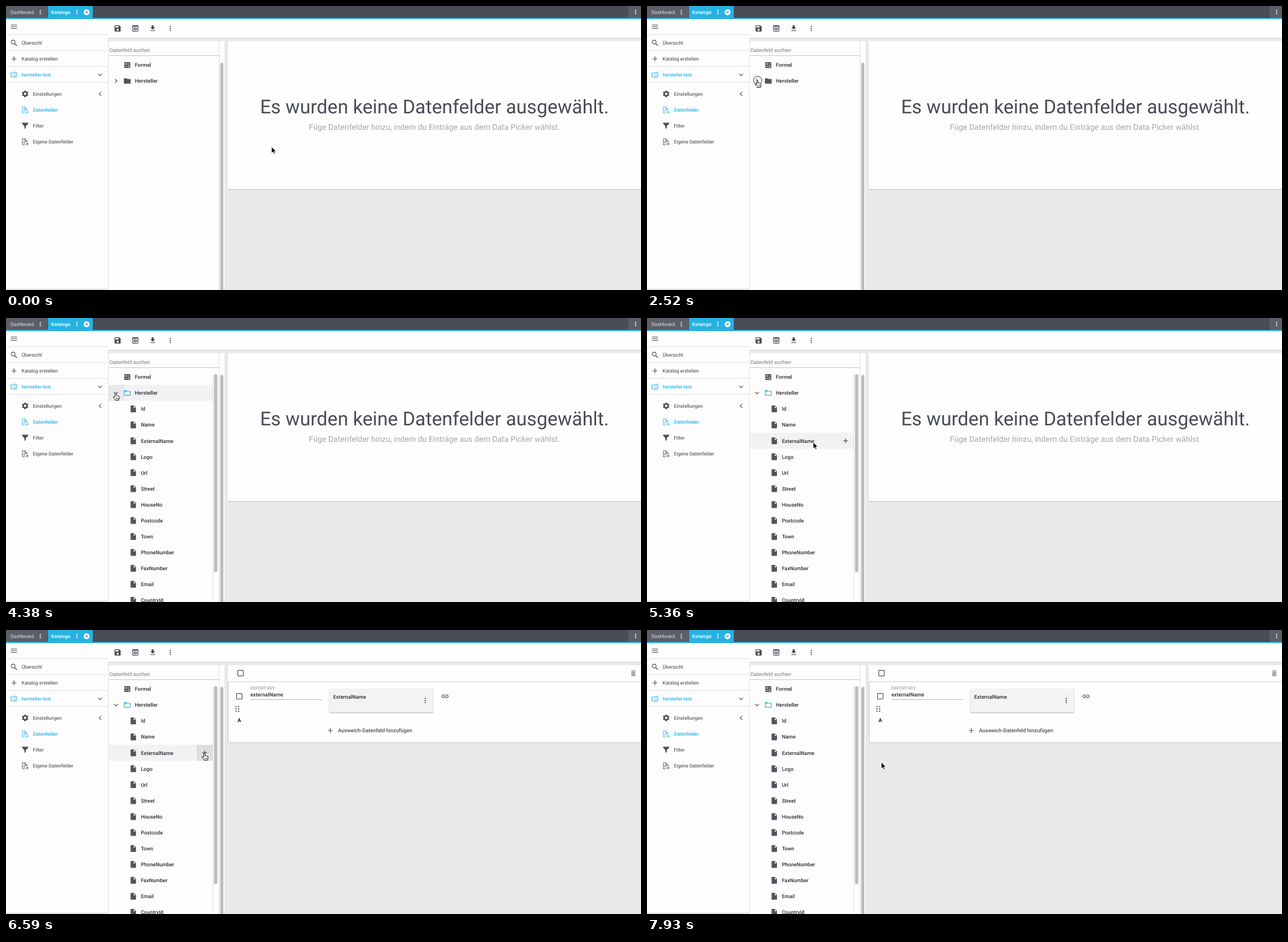
Recreate the animation shown at these times as an HTML page. Size 1119 by 500 pixels, loop 8 s.

```html
<!DOCTYPE html>
<html lang="de">
<head>
<meta charset="utf-8">
<title>Kataloge</title>
<style>
html, body { margin: 0; width: 100%; height: 100%; overflow: hidden; background: #e8e9eb; }
svg { display: block; width: 1119px; height: 500px; }
text { font-family: Roboto, Arial, sans-serif; font-size: 9.2px; fill: #3c3e47; text-rendering: geometricPrecision; white-space: pre; }
text.s { font-size: 8.5px; }
text.m { font-weight: 500; }
text.c { text-anchor: middle; }
</style>
</head>
<body>
<svg id="stage" viewBox="0 0 1119 500" xmlns="http://www.w3.org/2000/svg"></svg>
<script>
const DARK = '#4a4c56', CYAN = '#26b2e2', LINE = '#dedfe2', PAPER = '#fdfdfd', INK = '#2b2c33';
const ROW = 28.07, ROW0 = 132;
const FIELDS = ['Id', 'Name', 'ExternalName', 'Logo', 'Url', 'Street', 'HouseNo', 'Postcode',
  'Town', 'PhoneNumber', 'FaxNumber', 'Email', 'CountryId'];

const PATHS = {
  save: 'M17 3H5c-1.11 0-2 .9-2 2v14c0 1.1.89 2 2 2h14c1.1 0 2-.9 2-2V7l-4-4zm-5 16c-1.66 0-3-1.34-3-3s1.34-3 3-3 3 1.34 3 3-1.34 3-3 3zm3-10H5V5h10v4z',
  preview: 'M19 3H5c-1.11 0-2 .9-2 2v14c0 1.1.89 2 2 2h14c1.1 0 2-.9 2-2V5c0-1.1-.89-2-2-2zm0 16H5V7h14v12zm-5.5-6a1.5 1.5 0 1 1-3 0 1.5 1.5 0 1 1 3 0zM12 9c-2.73 0-5.06 1.66-6 4 .94 2.34 3.27 4 6 4s5.06-1.66 6-4c-.94-2.34-3.27-4-6-4zm0 6.5a2.5 2.5 0 1 1 0-5 2.5 2.5 0 1 1 0 5z',
  download: 'M19 9h-4V3H9v6H5l7 7 7-7zM5 18v2h14v-2H5z',
  gear: 'M19.14 12.94c.04-.3.06-.61.06-.94s-.02-.64-.07-.94l2.03-1.58a.49.49 0 0 0 .12-.61l-1.92-3.32a.49.49 0 0 0-.59-.22l-2.39.96a7 7 0 0 0-1.62-.94l-.36-2.54a.48.48 0 0 0-.48-.41h-3.84a.47.47 0 0 0-.47.41l-.36 2.54a7.2 7.2 0 0 0-1.62.94l-2.39-.96a.48.48 0 0 0-.59.22L2.74 8.87a.47.47 0 0 0 .12.61l2.03 1.58a6 6 0 0 0 0 1.88l-2.03 1.58a.49.49 0 0 0-.12.61l1.92 3.32c.12.22.37.29.59.22l2.39-.96a7 7 0 0 0 1.62.94l.36 2.54c.05.24.24.41.48.41h3.84c.24 0 .44-.17.47-.41l.36-2.54a7.2 7.2 0 0 0 1.62-.94l2.39.96c.22.08.47 0 .59-.22l1.92-3.32a.47.47 0 0 0-.12-.61zM12 15.6a3.6 3.6 0 1 1 0-7.2 3.6 3.6 0 1 1 0 7.2z',
  funnel: 'M3 3H21V5.500L14 13V18L10 21V13L3 5.500z',
  file: 'M13 9V3.5L18.500 9M6 2C4.890 2 4 2.890 4 4V20A2 2 0 0 0 6 22H18A2 2 0 0 0 20 20V8L14 2z',
  folder: 'M10 4H4C2.890 4 2 4.890 2 6V18A2 2 0 0 0 4 20H20A2 2 0 0 0 22 18V8C22 6.890 21.100 6 20 6H12z',
  folderOpen: 'M20 18H4V8H20M20 6H12L10 4H4C2.890 4 2 4.890 2 6V18A2 2 0 0 0 4 20H20A2 2 0 0 0 22 18V8C22 6.890 21.100 6 20 6z',
  box: 'M19 5v14H5V5h14m0-2H5c-1.1 0-2 .9-2 2v14c0 1.1.9 2 2 2h14c1.1 0 2-.9 2-2V5c0-1.1-.9-2-2-2z',
  link: 'M3.9 12c0-1.71 1.39-3.1 3.1-3.1h4V7H7a5 5 0 0 0 0 10h4v-1.9H7A3.1 3.1 0 0 1 3.9 12zM8 13h8v-2H8zm9-6h-4v1.9h4a3.1 3.1 0 0 1 0 6.2h-4V17h4a5 5 0 0 0 0-10z',
  trash: 'M6 19c0 1.100.900 2 2 2h8c1.100 0 2-.900 2-2V7H6zM19 4h-3.500l-1-1h-5l-1 1H5v2h14z'
};

const rect = (x, y, w, h, fill, extra = '') =>
  `<rect x="${x}" y="${y}" width="${w}" height="${h}" fill="${fill}" ${extra}/>`;
const text = (x, y, s, cls = '', fill = '', extra = '') =>
  `<text x="${x}" y="${y}" class="${cls}" style="${fill && 'fill:' + fill};${extra}">${s}</text>`;
const stroke = (d, color = DARK, w = 1.2, extra = '') =>
  `<path d="${d}" fill="none" stroke="${color}" stroke-width="${w}" ${extra}/>`;
const icon = (name, cx, cy, fill = DARK) =>
  `<path transform="translate(${cx - 7.2} ${cy - 7.2}) scale(.6)" fill="${fill}" fill-rule="evenodd" d="${PATHS[name]}"/>`;
const dot = (x, y, fill, r = 1.15) => `<circle cx="${x}" cy="${y}" r="${r}" fill="${fill}"/>`;
const dots = (x, y, fill = DARK, gap = 3.7) => [-gap, 0, gap].map(d => dot(x, y + d, fill)).join('');
const plus = (x, y, color = DARK, r = 4.2) => stroke(`M${x - r} ${y}h${2 * r}M${x} ${y - r}v${2 * r}`, color);
const chevron = (x, y, angle) =>
  stroke('M-1.700 -3.400L1.700 0L-1.700 3.400', DARK, 1.2, `transform="translate(${x} ${y}) rotate(${angle})"`);
const group = (id, body, hidden) => `<g id="${id}" ${hidden ? 'display="none"' : ''}>${body}</g>`;
const docPlus = (y, color) =>
  stroke(`M34 ${y + 5.3}H28.800V${y - 5.300}H33.500L37 ${y - 1.800}V${y + 1.300}M33.300 ${y - 5.300}V${y - 1.600}H37` +
    `M30.500 ${y - .200}H35M30.500 ${y + 2.200}H34M34.500 ${y + 3.900}H40M37.250 ${y + 1.200}V${y + 6.600}`, color, .9);

function topBar() {
  return rect(0, 0, 1119, 21, DARK) + rect(0, 0, 73, 21, '#5c5e68') + rect(74, 0, 79, 21, CYAN) +
    rect(1097, 0, 22, 21, '#5c5e68') + rect(0, 21, 1119, 2, CYAN) +
    text(8, 14, 'Dashboard', 's', '#e3e3e6') + dots(60.500, 11, '#e3e3e6', 3.2) +
    text(79.700, 14, 'Kataloge', 's m', '#fff') + dots(125, 11, '#fff', 3.2) +
    dot(142, 11, '#fff', 5.2) + stroke('M139.900 8.900l4.200 4.200m0 -4.200l-4.200 4.200', CYAN) +
    dots(1109.500, 10.700, '#e3e3e6', 3);
}

function sidebar() {
  const lines = [50.5, 78.5, 106.5, 134.5].map(y => rect(0, y - .5, 180, 1, LINE)).join('');
  return rect(0, 23, 180, 477, PAPER) + lines + rect(0, 498.2, 180, 1, '#d0d0d4') +
    stroke('M8.500 33.500h11M8.500 36.500h11M8.500 39.500h11', DARK, 1.1) +
    `<circle cx="12.700" cy="63.500" r="3.400" fill="none" stroke="${DARK}" stroke-width="1.100"/>` +
    stroke('M15.200 66l4 4', DARK, 1.3) + plus(14, 93) +
    stroke('M13.800 117.300H8.500V125.300H13.800ZM13.800 117.300L17 115.800V123.700L13.800 125.300M17 117.300H19.300V125.300H13.800M10.200 119v4.500', CYAN, .8) +
    text(27.600, 68, 'Übersicht', 's') + text(27.600, 96, 'Katalog erstellen', 's') +
    text(27.800, 124, 'hersteller-test', 'm', CYAN, 'font-size:8.2px') +
    chevron(166, 121, 90) + chevron(166, 154.700, 180) +
    icon('gear', 33.700, 154.700) + docPlus(183, CYAN) + icon('funnel', 33.700, 211) + docPlus(239, DARK) +
    text(47.400, 157.800, 'Einstellungen', 's') + text(47.400, 185.900, 'Datenfelder', 's m', CYAN) +
    text(47.400, 214, 'Filter', 's') + text(47.400, 242, 'Eigene Datenfelder', 's');
}

function toolbar() {
  return rect(180, 23, 939, 33, PAPER) + rect(180, 56, 939, 1.2, '#d3d4d7') +
    icon('save', 196.700, 39.500) + icon('preview', 227.800, 39.500) +
    icon('download', 258.500, 39.300) + dots(289.500, 39.500);
}

function tree() {
  const leaves = FIELDS.map((name, i) => {
    const y = ROW0 + ROW * (i + 1);
    return icon('file', 224.300, y, '#53545e') + text(237.700, y + 3.300, name, 'm', INK, 'font-size:9.1px');
  }).join('');
  return rect(180, 62, 205, 438, PAPER) + rect(375, 62, 1, 438, LINE) +
    rect(377.5, 100, 5.5, 410, '#bcbcbe', 'rx="2.700"') +
    text(182.500, 81.300, 'Datenfeld suchen', '', '#777880') + rect(182, 87, 193, 1, '#c2c3c7') +
    group('hover', rect(180, 0, 184, 28, '#f2f2f3') + rect(0, 0, 28, 28, '#dddee0', 'id="cell"') +
      group('add', plus(350, 14)), true) +
    rect(208.5, 98.8, 10.5, 10.5, '#53545e', 'rx="1.300"') +
    stroke('M210.200 102h3m-1.500 -1.500v3M214.700 102h2.800M210.200 106.400h3M214.700 105.500h2.800m-2.800 1.800h2.800', '#fff', .9) +
    text(227, 107.300, 'Formel', 'm', INK) + text(227, 135.300, 'Hersteller', 'm', INK) +
    group('closed', chevron(193.800, 132, 0) + icon('folder', 213.700, 132, '#53545e')) +
    group('open', chevron(193.800, 132, 90) + icon('folderOpen', 213.700, 132, CYAN) + leaves +
      rect(364, 99, 1, 401, LINE) + rect(366.5, 99, 6, 348, '#bcbcbe', 'id="thumb" rx="2.800"'), true) +
    rect(180, 57, 1, 443, LINE);
}

function emptyPanel() {
  return rect(391, 322, 728, 1.5, '#cfd1d6') + rect(391, 62, 728, 260, '#fefefe') +
    text(755, 189.300, 'Es wurden keine Datenfelder ausgewählt.', 'c', DARK, 'font-size:33.7px') +
    text(755, 218, 'Füge Datenfelder hinzu, indem du Einträge aus dem Data Picker wählst.', 'c', '#a5a6aa', 'font-size:14.04px');
}

function listPanel() {
  const grip = [405.3, 410].map(x => dots(x, 139, DARK, 4.1)).join('');
  return rect(391, 62, 728, 136, '#fefefe') +
    stroke('M1119 91H391.500V198H1119', '#c9ccd3', 1.2) +
    icon('box', 413.300, 76) + icon('trash', 1105.500, 76, '#a9aaae') +
    icon('box', 411.200, 116.700) + grip +
    text(411, 162, 'A', 'c', '#1c1c20', 'font-weight:700') +
    text(430.500, 105.300, 'EXPORT KEY', '', '#898a90', 'font-size:7.6px') +
    text(430.700, 116.700, 'externalName', 'm', INK) + rect(431, 122, 126, 1, '#b5b6ba') +
    rect(569.5, 104, 183.500, 42.500, '#c6c7ca', 'rx="2"') + rect(570, 103, 182.500, 42, '#f3f3f4', 'rx="2"') +
    text(576.500, 120.700, 'ExternalName', 'm', INK) + dots(738.800, 124) +
    icon('link', 773.700, 116.700) + plus(571.500, 177) +
    text(585, 180.300, 'Ausweich-Datenfeld hinzufügen', 'm', DARK);
}

function pointer() {
  const arrow = '<path d="M0 0V11L2.600 8.700L4.200 12.400L6 11.600L4.400 8H7.800Z" fill="#000" stroke="#fff" stroke-width=".7"/>';
  const hand = '<path d="M-1.100 7.400V1.100A1.100 1.100 0 0 1 1.100 1.100V4.600Q2.600 3.700 3.200 5Q4.600 4.400 5 5.800Q6.600 5.400 6.600 7.200V8.600Q6.600 10 5.600 11.200V12.500H-.600V11.400Q-2.400 9.600 -3.800 7.400Q-4 5.900 -2.600 6.300Z" fill="#fff" stroke="#000" stroke-width=".9" stroke-linejoin="round"/>' +
    stroke('M1.100 8.200v2.600M3 8.200v2.600M4.800 8.200v2.600', '#000', .7);
  return `<circle id="ring" r="7.300" fill="none" stroke="#222" stroke-width="1" display="none"/>` +
    group('cursor', group('arrow', arrow) + group('hand', hand, true));
}

document.getElementById('stage').innerHTML = rect(0, 0, 1119, 500, '#e8e9eb') +
  tree() + group('empty', emptyPanel()) + group('list', listPanel(), true) +
  toolbar() + sidebar() + topBar() + pointer();

const el = Object.fromEntries([...document.querySelectorAll('[id]')].map(e => [e.id, e]));
const show = (id, on) => el[id].setAttribute('display', on ? 'inline' : 'none');

const linear = p => p;
const smooth = p => p * p * (3 - 2 * p);
const easeOut = p => 1 - (1 - p) ** 1.4;

// Stepped pointer moves along quadratic curves.
const MOVES = [
  { start: 110, end: 380, steps: 4, from: [468, 248], via: [375, 231], to: [282, 215], ease: linear },
  { start: 560, end: 730, steps: 3, from: [282, 215], via: [259, 195], to: [237, 176], ease: linear },
  { start: 1270, end: 2060, steps: 10, from: [237, 176], via: [232, 137], to: [193, 131], ease: easeOut },
  { start: 2150, end: 2150, steps: 1, from: [193, 131], via: [194, 131], to: [194.5, 131], ease: linear },
  { start: 4380, end: 5180, steps: 10, from: [191, 130], via: [229, 169.5], to: [267, 209], ease: smooth },
  { start: 5270, end: 5980, steps: 9, from: [267, 209], via: [312, 231], to: [349.5, 216.7], ease: easeOut },
  { start: 7490, end: 7930, steps: 6, from: [349.5, 216.7], via: [381, 224.5], to: [413, 233], ease: linear }
];

function pointerAt(t) {
  const move = MOVES.filter(m => t >= m.start).pop();
  if (!move) return MOVES[0].from;
  const { start, end, steps, from, via, to, ease } = move;
  const frac = end > start ? Math.min(1, (t - start) / (end - start)) : 1;
  const p = ease((Math.floor(frac * (steps - 1) + .05) + 1) / steps), q = 1 - p;
  return from.map((a, i) => q * q * a + 2 * q * p * via[i] + p * p * to[i]);
}

function draw(t) {
  const [x, y] = pointerAt(t);
  const opened = t >= 3220, added = t >= 6590;
  const row = Math.floor((y - ROW0) / ROW + .5);
  const inRow = t >= 2600 && x < 364 && row >= 0;
  const onToggle = row === 0 && x < 208, onAdd = row > 0 && x >= 336 && x < 364;
  const clickable = t >= 2150 && (onToggle || onAdd);

  show('closed', !opened);
  show('open', opened);
  show('empty', !added);
  show('list', added);

  show('hover', inRow);
  show('add', row > 0);
  show('cell', onToggle || onAdd);
  el.hover.setAttribute('transform', `translate(0 ${ROW0 + ROW * row - 14})`);
  el.cell.setAttribute('x', onToggle ? 180 : 336);
  el.cell.setAttribute('fill', onToggle ? '#e8e8e9' : '#dddee0');
  el.thumb.setAttribute('fill', x > 365 && x < 374 ? '#8a8a8d' : '#bcbcbe');

  const firstClick = t >= 2520 && t < 2770, secondClick = t >= 6240 && t < 6500;
  show('ring', firstClick || secondClick);
  el.ring.setAttribute('transform', firstClick ? 'translate(195 131)' : 'translate(350.5 215.5)');

  show('arrow', !clickable);
  show('hand', clickable);
  el.cursor.setAttribute('transform', `translate(${x} ${y})`);
}

const began = performance.now();
function tick() {
  draw((performance.now() - began) % 8000);
  requestAnimationFrame(tick);
}
tick();
</script>
</body>
</html>
```
